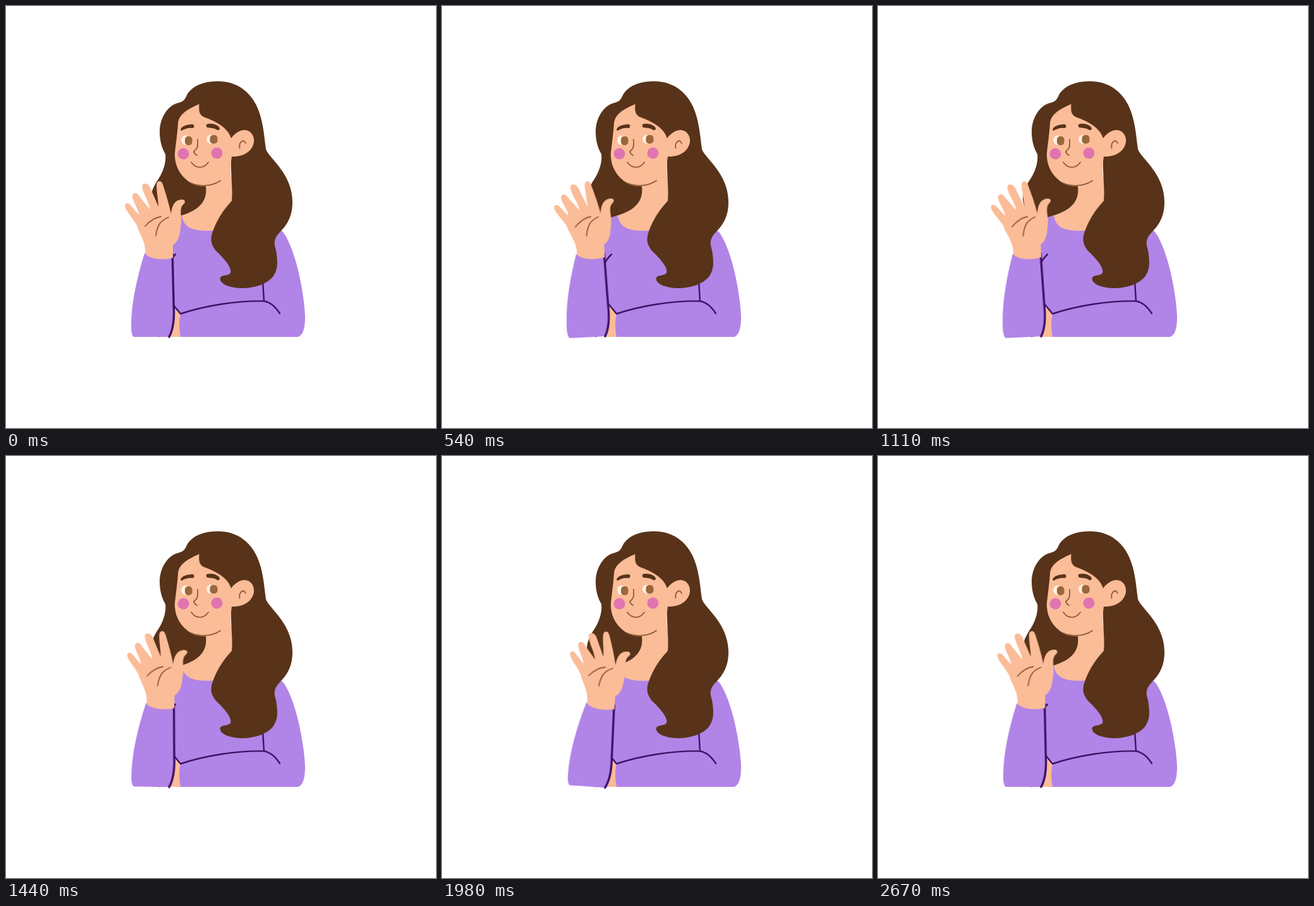
These frames come from a looping animation (680 by 667 pixels, 2.7 s). An HTML page:

```html
<!DOCTYPE html>
<html lang="en">
<head>
<meta charset="utf-8">
<title>Waving woman</title>
<style>
  html, body { margin: 0; width: 100%; height: 100%; overflow: hidden; background: #fff; }
  svg { display: block; width: 680px; height: 667px; }
  .skin { fill: #fbbc98; }
  .hair { fill: #583319; }
  .cloth { fill: #b184e7; }
  .blush { fill: #e074b1; }
  .iris { fill: #99673a; }
  .sclera { fill: #fdf0e2; }
  .seam, .line { fill: none; stroke-linecap: round; stroke-linejoin: round; }
  .seam { stroke: #3f1168; stroke-width: 2.4; }
  .edge { stroke-width: 3.4; }
  .line { stroke: #8f5c35; stroke-width: 1.8; }
  .arm { transform-origin: 240px 522px; animation: wave 2.7s linear infinite; }
  @keyframes wave {
    0%, 100% { transform: rotate(0deg); }
    33.3333% { transform: rotate(-5deg); }
    66.6667% { transform: rotate(5deg); }
  }
</style>
</head>
<body>
<svg viewBox="0 0 680 667">
  <!-- body -->
  <path class="cloth" d="M268 332C250 340 246 370 246 400V480L275 523H462C470 520 473 508 473 490C470 440 455 378 437 356L340 330Z"/>
  <path class="skin" d="M256 464L276 487C273 500 274 512 276 523H256Z"/>
  <path class="seam" d="M260 467L276 486.5C315 473.5 365 465.5 408 466.5C417 468 426 475 433 486M406 434L408 466.5M268 392.5Q261 399 254 412"/>
  <path class="seam" d="M242 522H244"/>
  <path class="skin" d="M300 270H360V355H327C302 356 281 354 278 331L300 300Z"/>

  <!-- head -->
  <path class="hair" d="M335 119C365 119 385 135 396 157C407 180 408 205 411 226C414 239 453 264 453 310C453 338 440 350 430 361C423 370 424 376 427 386C430 405 430 415 424 425C416 438 396 446 372 446C352 445 338 439 338.5 430C341 424 352 427 355 422C358 414 345 399 332 387C322 374 323 366 329 351C336 334 345 321 357 308C359 290 355 265 356 238H316V285C318 300 313 312 300 321C289 328 278 331 268 334C250 338 232 330 229 306C229 296 232 288 238 278C246 267 254 250 252 234C246 224 243 212 243 198C243 178 255 157 273 153C286 150 283 141 292 133C302 123 318 119 335 119Z"/>
  <path class="skin" d="M305.5 155C305 165 305 171 312 175C328 181 350 190 356 209C363 200 370 196 378 196C388 197 393 206 392 215C390 229 376 239 357 238C355 250 355 262 356 275L340 276C330 285 310 287 297 282C278 273 266 255 267 232C269 215 271 200 272 186C273 172 285 164 305.5 155Z"/>
  <path class="line" d="M369.5 224.5C368 215 376 209 379 217M303 211C304 224 302 226 297 230Q298 234 302 236M293 247C301 258 313 257 320 247M293 280C308 286 326 285 339 276"/>
  <path class="hair" d="M276 196C277 189 288 187 296 187Q299 190 296 193C288 192 283 194 278 197ZM317 187C325 184 336 188 338 193Q338 197 334 196C328 192 323 193 318 192Q316 190 317 187Z"/>
  <ellipse class="sclera" cx="284" cy="212" rx="7" ry="7.5"/>
  <ellipse class="sclera" cx="324" cy="210.5" rx="7" ry="7"/>
  <rect class="iris" x="283" y="206" width="11.5" height="14" rx="5"/>
  <rect class="iris" x="322.5" y="204" width="12" height="13.5" rx="5"/>
  <circle class="blush" cx="280.5" cy="233.5" r="9"/>
  <circle class="blush" cx="333.5" cy="232.5" r="9"/>

  <!-- waving arm -->
  <g class="arm">
    <path class="cloth" d="M219 391C207 430 198 470 198 506C198 515 199 521 202 523H258C267 505 265 490 265 474L263 392Z"/>
    <path class="seam edge" d="M263.2 392L265.2 474C266.5 495 265 510 258 523"/>
    <path class="skin" d="M220 392C222 372 210 360 207 347C201 335 188 323 188 315C189 310 195 311 198 316L210 330C209 318 199 308 200 299C202 294 208 295 211 301L228 322C226 308 214 293 215.5 283C218 279 225 280 228 287L241 317C241 306 237 288 238.5 280C241 275 246 276 248 282C253 298 258 313 261 329C262 316 267 305 280 306C285 308 283 312 279 315C274 322 278 334 277 344C275 358 275 371 264 378V398C250 402 230 401 220 392Z"/>
    <path class="line" d="M220 348C228 339 235 334 245 333M237 363C239 347 244 339 257 334"/>
  </g>
</svg>
</body>
</html>
```
